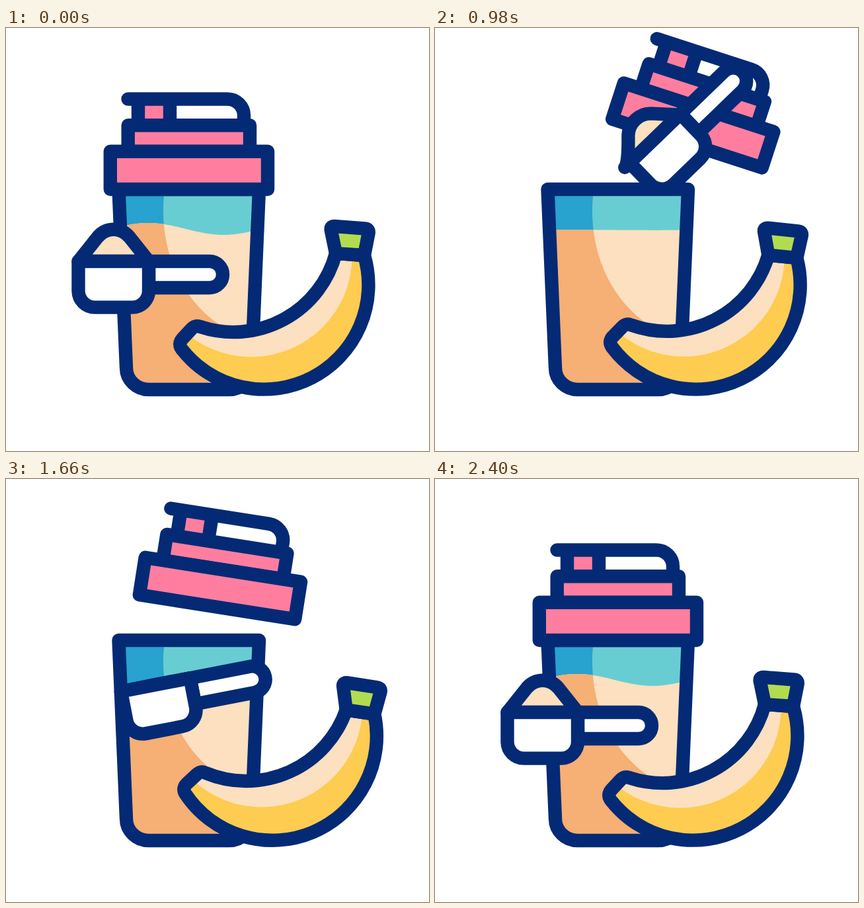
Animation, 640 px wide and 640 px high, one loop 2.52 s. Source, as an HTML page:

```html
<!DOCTYPE html>
<html lang="en">
<head>
<meta charset="utf-8">
<title>Protein shake</title>
<style>
  html, body { margin: 0; width: 100%; height: 100%; overflow: hidden; background: #fff; }
  svg { display: block; width: 100%; height: 100%; }
  .line { fill: none; stroke: #042a75; stroke-width: 20.4; stroke-linecap: round; stroke-linejoin: round; }
  .white { fill: #fff; }
  .pink { fill: #ff7ea0; }
  .cream { fill: #fce0bf; }
  .green { fill: #b2dc50; }
</style>
</head>
<body>
<svg viewBox="0 0 640 640">
  <defs>
    <path id="cup" d="M170.5 244H383L371.5 514A34 33 0 0 1 337.5 547H216A34 33 0 0 1 182 514Z"/>
    <path id="shade" d="M150 244H240C228 340 270 420 335 456L380 470V560H150Z"/>
    <path id="peel" d="M499 341A160 160 0 0 1 294 452Q287 449 281 455L267 470Q260 478 266 486A158 158 0 0 0 542 344Z"/>
    <path id="lidTrack" d="M0 0Q40 -64 125.7 -66"/>
    <path id="scoopTrack" d="M0 0Q123 -80.5 161.4 -227.6"/>
    <clipPath id="inCup"><use href="#cup"/></clipPath>
    <clipPath id="inLiquid"><path id="liquid"/></clipPath>
    <clipPath id="inPeel"><use href="#peel"/></clipPath>
    <clipPath id="aboveRim"><path d="M0 0H640V246H0Z"/></clipPath>
  </defs>

  <g clip-path="url(#inCup)">
    <path fill="#68cdd2" d="M150 230H400V560H150Z"/>
    <use href="#shade" fill="#28a2ce"/>
    <g clip-path="url(#inLiquid)">
      <path class="cream" d="M150 230H400V560H150Z"/>
      <use href="#shade" fill="#f6af74"/>
    </g>
  </g>
  <use href="#cup" class="line"/>

  <g id="lid">
    <path class="pink" d="M200 107.5H248V147H200Z"/>
    <path class="line" d="M200 107.5V147M248 107.5V147M184.5 107.5H335A25 25 0 0 1 360 132.5V147"/>
    <path class="line pink" d="M184.7 147.3H369V187H184.7Z"/>
    <path class="line pink" d="M157.8 186.8H396V244H157.8Z"/>
  </g>

  <g id="powderClip"><g id="powder"><path id="mound" class="line cream" transform="translate(109.5 353)"/></g></g>
  <g id="scoop">
    <path class="line white" d="M216 353H308A20 20 0 0 1 308 393H216Z"/>
    <path class="line white" d="M109.5 353H216V398A25 25 0 0 1 191 422.6H134.5A25 25 0 0 1 109.5 398Z"/>
  </g>

  <g id="banana">
    <use href="#peel" fill="#fdcc50"/>
    <circle class="cream" cx="371" cy="345" r="152.7" clip-path="url(#inPeel)"/>
    <use href="#peel" class="line"/>
    <path class="line green" d="M499 341L492 307Q490 299.500 498 300L543 303.500Q550 304 548.500 311L542 344Z"/>
  </g>
</svg>
<script>
const LOOP = 2520;
const { PI, cos, min, max } = Math;
const $ = id => document.getElementById(id);
const set = (id, name, value) => $(id).setAttribute(name, value);

// Eased rise from 0 to 1 between two times.
const ramp = (t, from, to) => (1 - cos(PI * max(0, min(1, (t - from) / (to - from))))) / 2;

function along(id, part) {
  const path = $(id);
  const { x, y } = path.getPointAtLength(part * path.getTotalLength());
  return `translate(${x} ${y})`;
}

// A half wave across the cup whose height swings from one sign to the other.
function drawLiquid(t) {
  const mix = (1 - cos(PI * min(t, 2400) / 600)) / 2;
  const crest = 215 + 11 * mix, height = 29.5 * mix - 9, level = 304 + 5.5 * mix;
  let d = 'M160 560';
  for (let x = 160; x <= 395; x += 5) {
    d += `L${x} ${level + height * cos(PI * (x - crest) / 114)}`;
  }
  set('liquid', 'd', d + 'V560Z');
}

function drawLid(t) {
  const open = ramp(t, 0, 500) - ramp(t, 1415, 1902);
  set('lid', 'transform', `${along('lidTrack', open)} rotate(${18 * open} 277 175.5)`);
}

function drawScoop(t) {
  const lift = ramp(t, 500, 900);
  const tilt = 44 * (lift - ramp(t, 1380, 1800));
  const pose = `${along('scoopTrack', lift - ramp(t, 1414, 1800))} rotate(${-tilt} 218.5 363)`;
  set('scoop', 'transform', pose);
  set('powder', 'transform', pose);

  // The powder slides off the low edge into the cup, then grows back.
  const pouring = t > 900 && t < 1260;
  const slide = pouring ? ramp(t, 900, 1260) : 0;
  const size = t < 1260 ? max(0, 1 - 1.3 * slide) : ramp(t, 1640, 1990);
  const shift = -160 * slide * slide;
  const at = (x, y) => `${x + shift} ${-y * size} `;
  set('mound', 'd', `M${-87 * slide} 0Q${at(0, 0)}${at(29.5, 37)}` +
    `C${at(42.5, 52)}${at(64, 52)}${at(77, 37)}L${at(106.5, 0)}Z`);
  set('powderClip', 'clip-path', pouring ? 'url(#aboveRim)' : 'none');
}

function drawBanana(t) {
  const swing = t < 500 ? ramp(t, 200, 500)
    : t > 2000 ? ramp(t, 2000, 2300) - 1
    : cos(PI * (t - 500) / 300);
  set('banana', 'transform', `rotate(${4.7 * swing} 395 555)`);
}

let start;
function frame(now) {
  start ??= now;
  const t = (now - start) % LOOP;
  drawLiquid(t);
  drawLid(t);
  drawScoop(t);
  drawBanana(t);
  requestAnimationFrame(frame);
}
requestAnimationFrame(frame);
</script>
</body>
</html>
```
